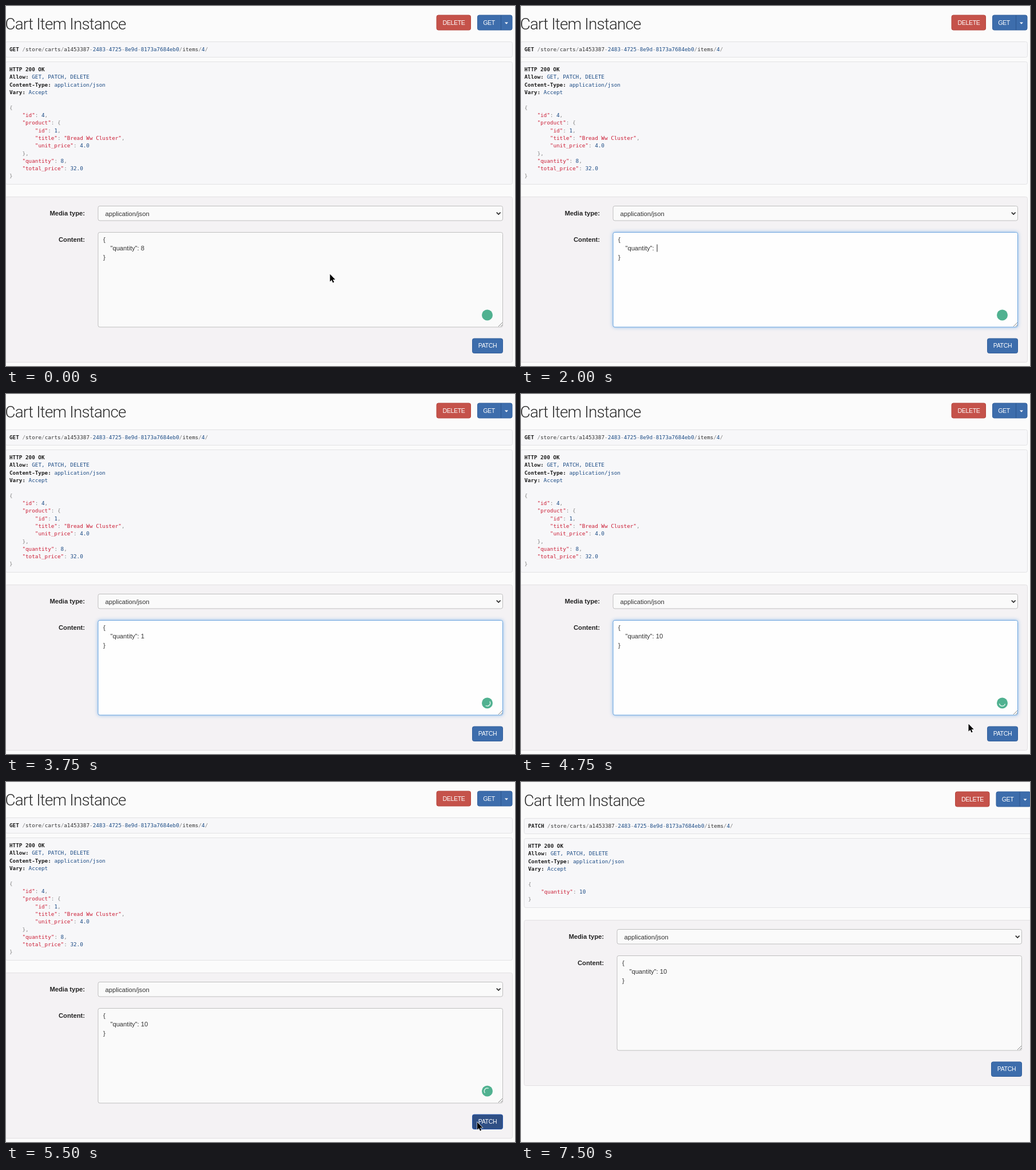
Animation of 890 by 629 pixels, one loop 8000 ms. Source, as an HTML page:

```html
<!DOCTYPE html>
<html lang="en">
<head>
<meta charset="utf-8">
<title>Cart Item Instance</title>
<style>
  html, body { margin: 0; width: 100%; height: 100%; overflow: hidden; background: #fbfbfb; }
  svg { display: block; width: 890px; height: 629px; }
  text { white-space: pre; fill: #333; font: 11.2px "Liberation Sans", Arial, sans-serif; }
  .title { font: 300 27.8px Roboto, sans-serif; letter-spacing: -.8px; fill: #2b2b2b; }
  .code text { font: 9.3px "DejaVu Sans Mono", monospace; }
  .bold { font-weight: bold; fill: #1c1c1c; }
  .label { font-weight: bold; text-anchor: end; fill: #222; }
  .btn { font-size: 10.6px; letter-spacing: -.4px; text-anchor: middle; fill: #fff; }
  .box { fill: #f7f7f9; stroke: #e2e2e4; }
  .well { fill: #f4f2f4; stroke: #e2e0e2; }
  .field { fill: #fafafa; stroke: #bfbfbf; }
  .focus { fill: #fefefe; stroke: #6ba4de; filter: drop-shadow(0 0 3px rgba(90, 160, 230, .65)); }
  .red { fill: #c5524a; stroke: #b5463e; }
  .blue { fill: #3d6dac; stroke: #33609c; }
  .hover { fill: #31568f; stroke: #284a80; }
  .down { fill: #2f4f85; stroke: #2b59ad; }
</style>
</head>
<body>
<svg viewBox="0 0 890 629">
  <g id="head">
    <text class="title" x="-1.5" y="40.5">Cart Item Instance</text>
    <rect class="red" x="753" y="16" width="59.5" height="26" rx="3"/>
    <text class="btn" x="783" y="33">DELETE</text>
    <rect class="blue" x="824.5" y="16" width="60.5" height="26" rx="3"/>
    <path d="M865.5 16v26" stroke="#2c568f"/>
    <text class="btn" x="844.5" y="33">GET</text>
    <path d="M872 28.5h6l-3 3.2z" fill="#fff"/>
    <rect class="box" x="-1" y="62.5" width="886.5" height="27" rx="3"/>
    <rect class="box" id="reply" x="-1" y="97.5" width="886.5" rx="3"/>
    <g class="code" id="code"></g>
  </g>
  <g id="form">
    <rect class="well" x="-1.5" y="333.5" width="887" height="289" rx="3"/>
    <text class="label" x="138" y="366">Media type:</text>
    <rect class="field" x="161" y="349.5" width="707.5" height="25.5" rx="3"/>
    <text x="173.5" y="366.5">application/json</text>
    <path d="M857.8 360.6l3.4 3.4 3.4-3.4" fill="none" stroke="#2a2a2a" stroke-width="1.7"/>
    <text class="label" x="138" y="411.5">Content:</text>
    <rect id="area" x="161" y="395.5" width="707.5" height="165.5" rx="3"/>
    <path d="M861 560l7-7M865 560l3-3" stroke="#777" stroke-width=".9"/>
    <text x="170" y="411.5">{</text>
    <text id="value" x="170" y="427"></text>
    <text x="170" y="442.6">}</text>
    <path id="caret" stroke="#222"/>
    <g id="badge">
      <circle cx="841.5" cy="540" r="9.5" fill="#50b190"/>
      <path id="spin" d="M843.2 535.1A5.2 5.2 0 0 1 843.2 544.9" fill="none" stroke="#d5f0e5" stroke-width="1.5" stroke-linecap="round"/>
    </g>
    <rect id="patch" x="815.5" y="581" width="53" height="25.5" rx="3"/>
    <text class="btn" x="842" y="597">PATCH</text>
  </g>
  <path id="mouse" d="M0 0V13L3 10.3 5 15 7.1 14.1 5.1 9.5H9.2Z" stroke="#fff" stroke-width="1.2" paint-order="stroke"/>
</svg>
<script>
const LOOP = 8000, SENT = 5750;
const $ = id => document.getElementById(id);

// Tracks hold [start, ...state]; a state lasts until the next start.
const mouse = [
  [0, 566.5, 468.5], [250, 347.5, 459.5], [500, 262.5, 435.5], [750, 291, 435.5],
  [1000, 280, 428], [2000], [4250, 422.5, 464.5], [4500, 590.5, 516.5],
  [4750, 782.5, 576.5], [5000, 822, 594.5], [5250, 824, 594.5],
  [6750, 631.5, 417.5], [7000, 630.5, 417.5], [7500]
];
const caret = [
  [0, 0], [1250, 244.3], [2000, 238], [2500, 0], [3000, 244.3],
  [3500, 0], [4000, 250.5], [4500, 0], [5000, 250.5], [5500, 0]
];
const typed = [[0, '8'], [2000, ''], [3000, '1'], [4000, '10']];
const button = [[0, 'blue'], [5000, 'hover'], [5500, 'down'], [SENT, 'blue']];
const at = (track, t) => track.findLast(s => s[0] <= t).slice(1);

const tint = (s, color) => `<tspan fill="${color}">${s}</tspan>`;
const bold = s => `<tspan class="bold">${s}</tspan>`;
const NAVY = '#1b4b85', GRAY = '#858585', RED = '#cb1d35';

const json = s => s.replace(/"[^"]*"|[\d.]+|[{}:,]+/g, m =>
  tint(m, m[0] == '"' ? RED : /\d/.test(m) ? NAVY : GRAY));
const url = s => s.split(/([\/-])/).map(p =>
  tint(p, /^[\/-]/.test(p) ? GRAY : /^\d/.test(p) ? NAVY : '#333')).join('');
const header = (k, v) => bold(k + ':') + ' ' + tint(v, NAVY);

function codeText(method, body) {
  const rows = [
    bold('HTTP 200 OK'),
    header('Allow', 'GET, PATCH, DELETE'),
    header('Content-Type', 'application/json'),
    header('Vary', 'Accept'),
    '',
    ...body.split('\n').map(json)
  ];
  const line = (s, y) => `<text x="6" y="${y}">${s}</text>`;
  return line(bold(method) + ' ' + url('/store/carts/a1453387-2483-4725-8e9d-8173a7684eb0/items/4/'), 79) +
    rows.map((s, i) => line(s, 114 + i * 13.32)).join('');
}

const item = {
  id: 4,
  product: { id: 1, title: 'Bread Ww Cluster', unit_price: '4.0' },
  quantity: 8,
  total_price: '32.0'
};
const pretty = o => JSON.stringify(o, null, 4).replace(/"(\d+\.\d)"/g, '$1');
const before = codeText('GET', pretty(item));
const after = codeText('PATCH', pretty({ quantity: 10 }));

const show = (id, on) => $(id).setAttribute('visibility', on ? 'visible' : 'hidden');
const move = (id, x, y) => $(id).setAttribute('transform', `translate(${x} ${y})`);
let wasSent;

function draw(t) {
  t = Math.floor(t / 250) * 250;
  const sent = t >= SENT;
  if (sent !== wasSent) {
    wasSent = sent;
    $('code').innerHTML = sent ? after : before;
    $('reply').setAttribute('height', sent ? 121 : 214);
    move('head', sent ? 6.5 : 0, sent ? 1 : 0);
    move('form', sent ? 7 : 0, sent ? -92 : 0);
  }

  $('value').textContent = '    "quantity": ' + at(typed, t)[0];
  $('area').setAttribute('class', t >= 1000 && t < 5500 ? 'focus' : 'field');
  $('patch').setAttribute('class', at(button, t)[0]);

  const [cx] = at(caret, t);
  show('caret', cx);
  $('caret').setAttribute('d', `M${cx} 416.5v13`);

  show('badge', !sent);
  show('spin', !sent && t >= 2500);
  $('spin').setAttribute('transform', `rotate(${45 + (t - 3750) / 250 * 282} 841.5 540)`);

  const [mx, my] = at(mouse, t);
  show('mouse', mx);
  if (mx) move('mouse', mx, my);
}

const start = performance.now();
(function tick() {
  draw((performance.now() - start) % LOOP);
  requestAnimationFrame(tick);
})();
</script>
</body>
</html>
```
